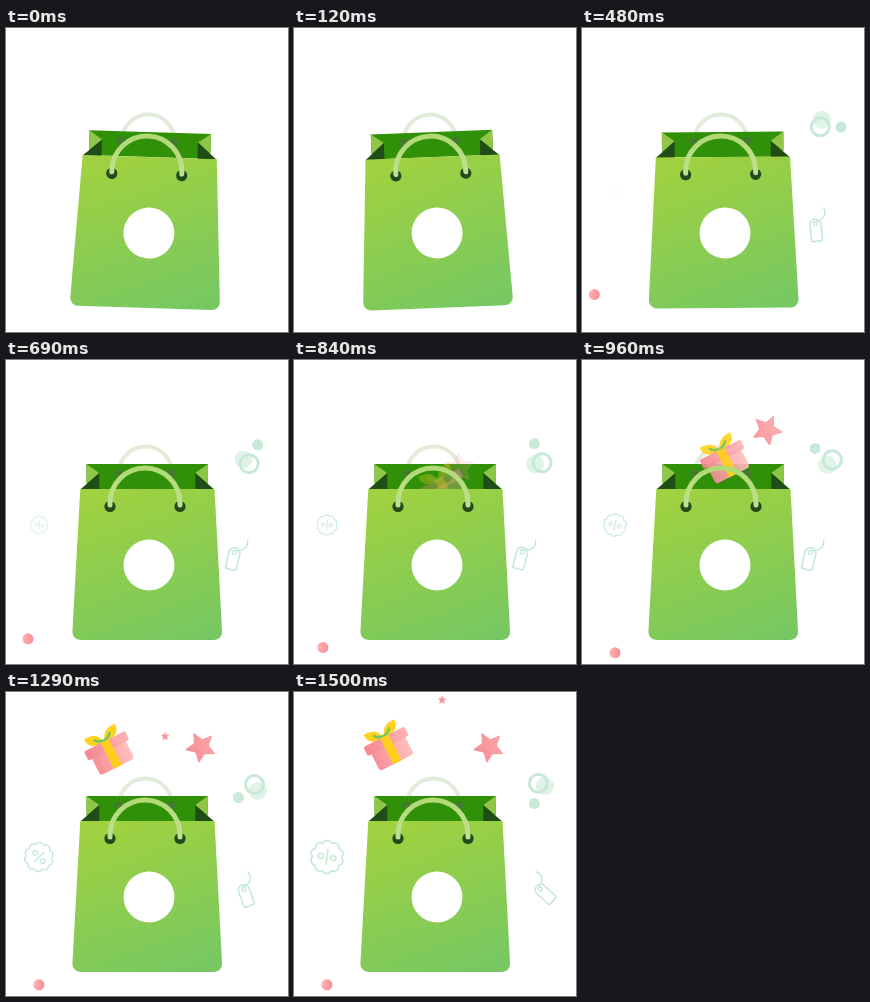
An HTML page with a canvas that plays this animation: 282x304 px, repeating every 1.53 s.

```html
<!DOCTYPE html>
<html lang="en">
<head>
<meta charset="utf-8">
<title>Shopping bag</title>
<style>
  html, body { margin: 0; width: 100%; height: 100%; overflow: hidden; background: #fff; }
  canvas { display: block; }
</style>
</head>
<body>
<canvas id="stage" width="282" height="304"></canvas>
<script>
const ctx = document.getElementById('stage').getContext('2d');
const LOOP = 1530, STEP = 30, TAU = Math.PI * 2;
const rad = deg => deg * Math.PI / 180;
const ramp = (t, from, to) => Math.min(1, Math.max(0, (t - from) / (to - from)));

// Smooth curve through [time, value] keys; flat before the first and after the last.
function track(keys) {
  const end = keys.length - 1;
  const slope = i => {
    const [t0, v0] = keys[Math.max(0, i - 1)], [t1, v1] = keys[Math.min(end, i + 1)];
    return (v1 - v0) / (t1 - t0);
  };
  return t => {
    if (t <= keys[0][0]) return keys[0][1];
    if (t >= keys[end][0]) return keys[end][1];
    const i = keys.findIndex(k => k[0] > t) - 1;
    const [t0, v0] = keys[i], [t1, v1] = keys[i + 1];
    const d = t1 - t0, u = (t - t0) / d;
    const a = u * u * (3 - 2 * u);
    return v0 + (v1 - v0) * a +
      d * u * (1 - u) * ((1 - u) * slope(i) - u * slope(i + 1));
  };
}

const motion = {
  sway: track([[0, 1.8], [130, -2.3], [300, 1.2], [420, -0.5], [540, 0]]),
  orbit: track([[0, 95], [300, 0], [690, -124], [960, -205], [1140, -247], [1500, -317]]),
  tag: track([[120, -18], [300, 0], [690, 37], [825, 38.5], [960, 37], [1140, 22], [1500, -23]]),
  badge: track([[690, -35], [960, -30], [1140, 20], [1500, -35]]),
  giftX: track([[760, 150], [960, 141], [1140, 111], [1500, 93]]),
  giftY: track([[760, 146], [960, 96], [1140, 63], [1500, 51]]),
  starX: track([[810, 160], [960, 185], [1080, 194], [1140, 195]]),
  starY: track([[810, 118], [960, 70], [1080, 56], [1140, 55]]),
  starTurn: track([[810, -30], [960, 8], [1080, 24], [1140, 26]]),
  sparkX: track([[1050, 169], [1140, 166.5], [1500, 148]]),
  sparkY: track([[1050, 90], [1140, 71], [1500, 8]])
};

function placed(x, y, angle, alpha, draw) {
  if (alpha <= 0) return;
  ctx.save();
  ctx.globalAlpha = alpha;
  ctx.translate(x, y);
  ctx.rotate(rad(angle));
  draw();
  ctx.restore();
}

function linear(x0, y0, x1, y1, from, to) {
  const g = ctx.createLinearGradient(x0, y0, x1, y1);
  g.addColorStop(0, from);
  g.addColorStop(1, to);
  return g;
}

function polygon(points, fill) {
  ctx.beginPath();
  points.forEach(([x, y]) => ctx.lineTo(x, y));
  ctx.closePath();
  ctx.fillStyle = fill;
  ctx.fill();
}

function disc(x, y, r, fill) {
  ctx.beginPath();
  ctx.arc(x, y, r, 0, TAU);
  ctx.fillStyle = fill;
  ctx.fill();
}

function stroke(color, width) {
  ctx.strokeStyle = color;
  ctx.lineWidth = width;
  ctx.stroke();
}

function roundBox(x, y, w, h, r, fill) {
  ctx.beginPath();
  ctx.roundRect(x, y, w, h, r);
  if (fill) {
    ctx.fillStyle = fill;
    ctx.fill();
  }
}

function drawBubbles(t) {
  const turn = motion.orbit(t);
  const at = (angle, r) => [
    244.5 + r * Math.cos(rad(angle + turn)),
    97.5 + r * Math.sin(rad(angle + turn))
  ];
  placed(0, 0, 0, ramp(t, 150, 300), () => {
    disc(...at(-71, 7.4), 9, '#e0f3e9');
    ctx.beginPath();
    ctx.arc(...at(226, 6.3), 9, 0, TAU);
    stroke('#c8e9d8', 3);
    disc(...at(63.5, 14.6), 5.5, '#c8e9d8');
  });
}

function drawTag(t) {
  const color = '#c6e9d5';
  placed(241.5, 179.5, motion.tag(t), ramp(t, 150, 300), () => {
    ctx.beginPath();
    ctx.moveTo(0, 0);
    ctx.bezierCurveTo(6, 6, 4, 11, -4, 17);
    stroke(color, 1.4);
    ctx.translate(0, 24);
    ctx.rotate(rad(-24));
    roundBox(-5.5, -11, 11, 22, [5, 5, 2, 2]);
    stroke(color, 1.6);
    ctx.beginPath();
    ctx.arc(0, -6.5, 2, 0, TAU);
    stroke(color, 1.3);
  });
}

function drawBadge(t) {
  const r = 9 + (t - 690) * 0.0098, color = '#cbebd8';
  placed(33, 165, motion.badge(t), ramp(t, 450, 750), () => {
    ctx.scale(r / 17, r / 17);
    ctx.beginPath();
    for (let i = 0; i <= 120; i++) {
      const a = i / 120 * TAU;
      const edge = 14.6 + 2 * Math.abs(Math.sin(a * 5));
      ctx.lineTo(edge * Math.cos(a), edge * Math.sin(a));
    }
    ctx.closePath();
    stroke(color, 1.8);
    ctx.beginPath();
    ctx.moveTo(-5.5, 6);
    ctx.lineTo(5.5, -6);
    stroke(color, 1.8);
    for (const s of [-1, 1]) {
      ctx.beginPath();
      ctx.arc(s * 4.5, s * 4.5, 2.6, 0, TAU);
      stroke(color, 1.7);
    }
  });
}

function drawBall(t) {
  const u = Math.min(t, 930) - 300;
  placed(4 + u * 0.046, 256 + u * 0.0585, 0, ramp(t, 120, 240), () =>
    disc(0, 0, 5.5, linear(-5, 0, 5, 0, '#ffb0ae', '#f78d96')));
}

function drawStar(x, y, r, angle, alpha) {
  placed(x, y, angle, alpha, () => {
    const points = Array.from({ length: 10 }, (_, i) => {
      const reach = i % 2 ? r * 0.48 : r;
      return [reach * Math.cos(i * TAU / 10), reach * Math.sin(i * TAU / 10)];
    });
    const paint = linear(-r, r, r, -r, '#f68792', '#fdabab');
    polygon(points, paint);
    ctx.lineJoin = 'round';
    stroke(paint, r / 12);
  });
}

function drawGift(t) {
  placed(motion.giftX(t), motion.giftY(t), -27, ramp(t, 780, 980), () => {
    for (const s of [-1, 1]) {
      ctx.beginPath();
      ctx.moveTo(0, -6);
      ctx.bezierCurveTo(s * 3, -17, s * 9, -18, s * 17, -18);
      ctx.bezierCurveTo(s * 18, -10, s * 12, -5, 0, -6);
      ctx.fillStyle = '#ffd21c';
      ctx.fill();
      ctx.beginPath();
      ctx.moveTo(0, -8);
      ctx.quadraticCurveTo(s * 6, -8, s * 9, -13);
      stroke('#72c465', 2.5);
    }
    roundBox(-19, 0, 38, 22, [0, 0, 3, 3], linear(-19, 10, 19, 10, '#f78f98', '#ffc0bd'));
    roundBox(-23, -7, 46, 10, 2, linear(-23, 0, 23, 0, '#f58691', '#fdb3b2'));
    ctx.fillStyle = '#ffcf1a';
    ctx.fillRect(-4, -7, 9, 29);
  });
}

function drawBagBack() {
  ctx.beginPath();
  ctx.arc(139.5, 113, 26.5, Math.PI, TAU);
  stroke('#e3ebdb', 4);
  polygon([[80.5, 104], [202, 104], [202, 123], [189, 129], [93, 129], [80.5, 123]], '#309008');
  for (const x of [112.5, 165.5]) disc(x, 113.5, 4.3, '#437a2d');
  for (const s of [-1, 1]) {
    const side = x => 141.25 + s * x;
    polygon([[side(60.7), 104], [side(48), 113], [side(60.7), 124]], '#8fc648');
    polygon([[side(48), 113], [side(48), 129.5], [side(67), 129.5]], '#1f4d15');
  }
}

function drawBagFront() {
  ctx.beginPath();
  ctx.moveTo(74.3, 129);
  ctx.lineTo(208.5, 129);
  ctx.arcTo(216.5, 280, 208, 280, 8);
  ctx.arcTo(66, 280, 66.4, 272, 8);
  ctx.closePath();
  ctx.fillStyle = linear(115, 130, 170, 285, '#9fd140', '#77c862');
  ctx.fill();
  disc(143, 205, 25.5, '#fff');

  for (const x of [104, 174]) disc(x, 146.5, 5.6, '#234a1c');
  ctx.beginPath();
  ctx.moveTo(104, 145);
  ctx.arc(139, 143, 35, Math.PI, TAU);
  ctx.lineTo(174, 145);
  ctx.lineCap = 'round';
  stroke(linear(0, 108, 0, 147, '#b1d976', '#c1e092'), 5);
}

function render(t) {
  ctx.clearRect(0, 0, 282, 304);
  drawBubbles(t);
  drawTag(t);
  drawBadge(t);
  drawBall(t);

  ctx.save();
  ctx.translate(141, 202);
  ctx.rotate(rad(motion.sway(t)));
  ctx.translate(-141, -202);
  drawBagBack();
  drawStar(motion.starX(t), motion.starY(t), 15, motion.starTurn(t), ramp(t, 810, 980));
  drawStar(motion.sparkX(t), motion.sparkY(t), 4.2, -90, ramp(t, 1050, 1140));
  drawGift(t);
  drawBagFront();
  ctx.restore();
}

function tick() {
  const t = performance.now() % LOOP;
  render(Math.floor(t / STEP) * STEP);
  requestAnimationFrame(tick);
}
tick();
</script>
</body>
</html>
```
